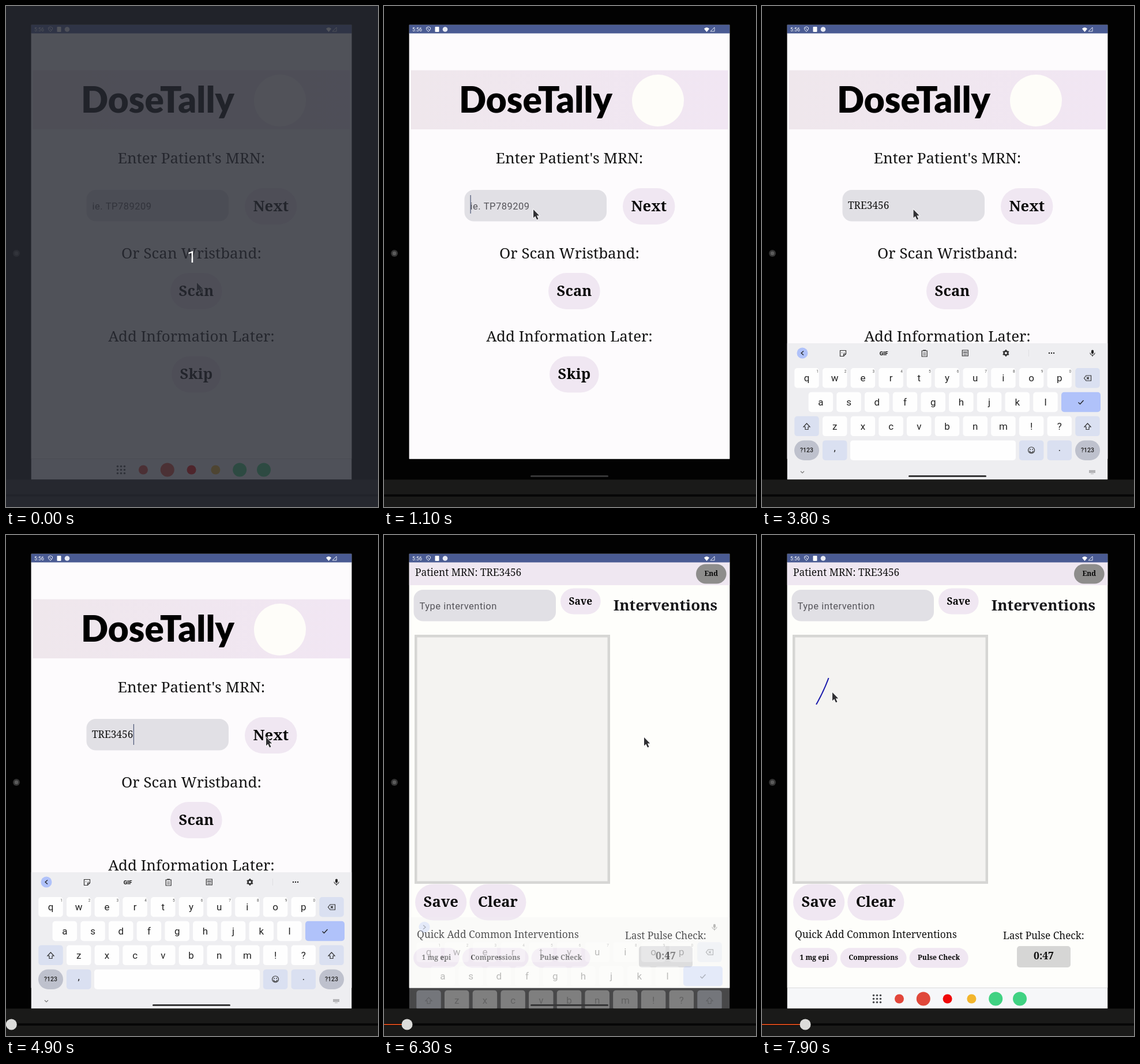
Recreate the animation shown at these times as an HTML page with a canvas. Size 645x869 px, loop 8 s.

```html
<!DOCTYPE html>
<html lang="en">
<head>
<meta charset="utf-8">
<title>Patient charting demo</title>
<style>
html, body { margin: 0; width: 100%; height: 100%; overflow: hidden; background: #000; }
canvas { display: block; }
</style>
</head>
<body>
<canvas id="stage" width="645" height="869"></canvas>
<script>
const ctx = document.getElementById('stage').getContext('2d');
const LOOP = 8000;
const STEP = 100;
const SERIF = '"Noto Serif", serif';
const SANS = 'Roboto, sans-serif';
const LILAC = '#f0e7f2', FIELD = '#e1e0e5', INK = '#111', ICON = '#333';
const KEY_WHITE = '#fefefe', KEY_BLUE = '#dae0f1', KEY_GREY = '#bec1cd', ACCENT = '#b0c2fa';
const SCREEN = { left: 43.5, top: 32.5, width: 556, navY: 785.5, bottom: 821.5 };
const MRN = 'TRE3456';
const COMMIT = 3300, NEXT_CLICK = 4300;

const clamp = (v, low, high) => Math.min(high, Math.max(low, v));
const ramp = (t, from, to) => clamp((t - from) / (to - from), 0, 1);
const easeOut = k => 1 - (1 - k) ** 2;
const easeInOut = k => k < 0.5 ? 4 * k ** 3 : 1 - 4 * (1 - k) ** 3;

function rect(x, y, w, h, color) {
  ctx.fillStyle = color;
  ctx.fillRect(x, y, w, h);
}

function round(x, y, w, h, r, color) {
  ctx.fillStyle = color;
  ctx.beginPath();
  ctx.roundRect(x, y, w, h, r);
  ctx.fill();
}

function disc(x, y, r, color) {
  round(x - r, y - r, 2 * r, 2 * r, r, color);
}

function text(str, x, y, font, color = INK, align = 'left', spacing = 0) {
  ctx.font = font;
  ctx.fillStyle = color;
  ctx.textAlign = align;
  ctx.letterSpacing = spacing + 'px';
  ctx.fillText(str, x, y);
  ctx.letterSpacing = '0px';
}

// Strokes a small path given relative to (x, y).
function glyph(path, x, y, color = ICON, width = 1.2, fill) {
  ctx.save();
  ctx.translate(x, y);
  ctx.strokeStyle = color;
  ctx.lineWidth = width;
  const shape = new Path2D(path);
  ctx.stroke(shape);
  if (fill) {
    ctx.fillStyle = fill;
    ctx.fill(shape);
  }
  ctx.restore();
}

function ring(x, y, r, width = 1.2, from = 0, to = 2 * Math.PI) {
  ctx.beginPath();
  ctx.arc(x, y, r, from, to);
  ctx.strokeStyle = ICON;
  ctx.lineWidth = width;
  ctx.stroke();
}

function faded(alpha, draw) {
  if (alpha <= 0) return;
  ctx.save();
  ctx.globalAlpha = alpha;
  draw();
  ctx.restore();
}

// Pill that fits its label; returns the left edge of the next one in a row.
function button(label, x, midY, size, fill = LILAC) {
  ctx.font = `bold ${size}px ${SERIF}`;
  const width = ctx.measureText(label).width + 29;
  const height = 8.5 + 2.13 * size;
  round(x, midY - height / 2, width, height, height / 2, fill);
  text(label, x + width / 2, midY + 0.33 * size, ctx.font, '#080808', 'center');
  return x + width + 5;
}

function field(x, y, hint) {
  round(x, y, 246.5, 54.5, 16, FIELD);
  text(hint, x + 10, y + 34, `16.5px ${SANS}`, '#55545a', 'left', 0.5);
}

function typedCount(t) {
  const letters = clamp(Math.floor((t - 1600) / 100), 0, 3);
  const digits = clamp(Math.floor((t - 2270) / 130), 0, 4);
  return letters + digits;
}

const typedText = t => MRN.slice(0, typedCount(t));

// The caret blinks at 500 ms, restarting with each input event.
function caretVisible(t) {
  if (t < 800) return false;
  const now = Math.min(t, NEXT_CLICK);
  let last = now >= COMMIT ? COMMIT : now;
  while (last > 800 && last !== COMMIT && typedCount(last) === typedCount(last - STEP)) last -= STEP;
  return Math.floor((now - last) / 500) % 2 === 0;
}

function entryScreen(t) {
  rect(SCREEN.left, 47, SCREEN.width, SCREEN.navY - 47, '#fdfbfd');
  const banner = ctx.createLinearGradient(47, 0, 597, 0);
  banner.addColorStop(0, '#efe7ec');
  banner.addColorStop(1, '#f1e6f3');
  rect(46.5, 111.5, 550, 102.5, banner);
  text('DoseTally', 130, 185, '900 62px Lato, sans-serif', '#000');
  disc(475, 164, 45, '#fefdf9');

  const heading = (str, y) => text(str, 321.5, y, `26px ${SERIF}`, '#151515', 'center');
  heading("Enter Patient's MRN:", 273);
  heading('Or Scan Wristband:', 438);
  heading('Add Information Later:', 582);
  button('Next', 414, 347.5, 25.5);
  button('Scan', 285, 494.5, 25.5);
  button('Skip', 287, 639, 25.5);

  const typed = typedText(t);
  field(139.5, 319, typed ? '' : 'ie. TP789209');
  text(typed, 149, 352, `17.3px ${SERIF}`);
  const width = ctx.measureText(typed).width;
  if (t < COMMIT) rect(149, 354, width, 1.2, '#222');
  if (caretVisible(t)) rect(149.5 + width, 328, 1.2, typed ? 36 : 32, '#4a5575');
}

// Pen position while drawing: a nearly straight upstroke that steepens.
const penPoint = k => [94 + 26 * k - 4.5 * k * k, 294 - 46 * k];
const penProgress = t => easeInOut(ramp(t, 7400, 7800));

function chartScreen(t) {
  rect(SCREEN.left, 47, SCREEN.width, SCREEN.navY - 47, '#fefefb');
  rect(SCREEN.left, 47, SCREEN.width, 40, '#efe7f1');
  text('Patient MRN: ' + MRN, 54, 71, `17.3px ${SERIF}`);
  button('End', 541, 67.5, 12, '#8e8d8c');
  field(51.5, 95, 'Type intervention');
  button('Save', 306, 115, 17.2);
  text('Interventions', 488, 131, `bold 26px ${SERIF}`, '#19191c', 'center');

  rect(53, 173, 339, 432, '#d6d6d4');
  rect(57.5, 177.5, 330, 423, '#f4f3f1');
  button('Clear', button('Save', 54, 637, 25.5), 637, 25.5);
  text('Quick Add Common Interventions', 57, 699, `17.3px ${SERIF}`);
  text('Last Pulse Check:', 418, 701, `17.2px ${SERIF}`);
  ['1 mg epi', 'Compressions', 'Pulse Check']
    .reduce((x, label) => button(label, x, 733.5, 12.1), 51);
  round(442, 713, 93, 37, 5, '#d6d6d5');
  text('0:47', 488.5, 736, `bold 17.6px ${SERIF}`, INK, 'center');

  const drawn = penProgress(t);
  if (!drawn) return;
  ctx.beginPath();
  for (let i = 0; i <= 10; i++) ctx.lineTo(...penPoint(drawn * i / 10));
  ctx.strokeStyle = '#1a1aac';
  ctx.lineWidth = 2;
  ctx.stroke();
}

function statusBar() {
  rect(SCREEN.left, SCREEN.top, SCREEN.width, 15, '#4a5b93');
  text('5:56', 49, 44, `8.8px ${SANS}`, '#fff');
  glyph('M0-4l3.5 1.5v3l-3.5 4-3.5-4v-3zM-2-2l4 4', 77, 40, '#e8ebf5', 1);
  round(88.5, 36, 7, 9, 1, '#fff');
  disc(106, 40.5, 4.3, '#e8ebf5');
  glyph('M0 4l-4-5q4-3.5 8 0z', 559.5, 40.5, '#fff', 1, '#fff');
  glyph('M-3.5 3.5h7v-7z', 569.5, 40.5, '#dfe3f0', 1);
}

function dock() {
  rect(SCREEN.left, SCREEN.navY, SCREEN.width, 37, '#f6f7f9');
  for (let i = 0; i < 9; i++) disc(193.5 + i % 3 * 6, 798.5 + Math.floor(i / 3) * 6, 1.8, '#4b4d50');
  const apps = ['#e2463a', '#e0483a', '#f00808', '#f2b52c', '#40d282', '#40d282'];
  apps.forEach((color, i) => disc(238 + i * 41.8, 804.5, i % 4 === 1 || i > 3 ? 12 : 8, color));
}

const column = i => 77.5 + i * 48.7;
const rowY = row => 628 + row * 41.8;

function key(x, row, label = '', fill = KEY_WHITE, width = 42.5, r = 5, font = `17px ${SANS}`) {
  round(x - width / 2, rowY(row), width, 34.5, r, fill);
  text(label, x, rowY(row) + (label.length > 1 ? 21 : 23), font, '#222', 'center');
}

function suggestions(word) {
  [word, 'R' + word.slice(1), word + '09'].forEach((str, i) =>
    text(str, 161 + i * 159.5, 607, `12.8px ${SANS}`, ICON, 'center'));
  for (const x of [237, 405]) rect(x, 595, 1, 14, '#d8d8dc');
}

function toolIcons() {
  const slot = i => 140.5 + i * 70.6;
  glyph('M-5-4.5h10v6l-4 4h-6zM5 1.5h-4v4M-2-1v1M2-1v1', slot(0), 602);
  text('GIF', slot(1), 605.5, `900 9.5px ${SANS}`, '#222', 'center');
  glyph('M-4.5-4h9v10h-9zM-2.5-5h5M-2.5 0h5M-2.5 3h5', slot(2), 602);
  glyph('M-5-5h10v10h-10zM-3.5-2h7M-3.5 0h7M-3 3h6', slot(3), 602);
  ring(slot(4), 602, 3.4, 2.6);
  for (let i = 0; i < 6; i++) {
    const angle = (i + 0.5) * Math.PI / 3;
    disc(slot(4) + 4.8 * Math.cos(angle), 602 + 4.8 * Math.sin(angle), 1.2, ICON);
  }
  for (let i = -1; i < 2; i++) disc(502 + 4 * i, 602, 1.2, '#222');
  rect(462, 596, 1, 12, '#dedee2');
}

function strip(t) {
  const word = t < COMMIT ? typedText(t) : '';
  const closing = t > 6100;
  disc(70, 602, 9.5, ACCENT);
  glyph(word || closing ? 'M-2-3.5l4 3.5-4 3.5' : 'M2-3.5l-4 3.5 4 3.5', 70, 602, '#222', 1.3);
  if (word) suggestions(word);
  else if (!closing) toolIcons();
  round(571, 596.5, 4, 7, 2, '#222');
  ring(573, 601.5, 4, 1.2, 0, Math.PI);
  rect(572.4, 605, 1.2, 3, ICON);
}

function keyboard(t) {
  rect(SCREEN.left, 585, SCREEN.width, 237, '#eeeef1');
  strip(t);
  ['qwertyuiop', 'asdfghjkl', 'zxcvbnm!?'].forEach((letters, row) =>
    [...letters].forEach((c, i) => key(column(i + row / 2), row, c)));
  for (let i = 0; i < 10; i++) {
    text((i + 1) % 10, column(i) + 18.5, 636, `6.5px ${SANS}`, '#555', 'center');
  }

  key(column(10), 0, '', KEY_BLUE);
  glyph('M-6 0l3.5-4.5h8.5v9h-8.5zM-1.5-2l4 4M2.5-2l-4 4', column(10), 645.5);
  key(553, 1, '', ACCENT, 68);
  glyph('M-4.5 0l3 3 6-6.5', 553, 687.5, '#222', 1.4);
  for (const x of [column(0), column(10)]) {
    key(x, 2, '', KEY_BLUE);
    glyph('M0-5.5l5.5 6h-3v4.5h-5v-4.5h-3z', x, 729.5);
    key(x, 3, '?123', KEY_GREY, 43, 17, `500 10.5px ${SANS}`);
  }
  key(column(1), 3, '', KEY_BLUE);
  text(',', column(1), 771.5, `17px ${SANS}`, '#222', 'center');
  key(296.5, 3, '', KEY_WHITE, 287);
  key(column(8), 3, '', KEY_BLUE);
  ring(column(8), 770.5, 5.5);
  ring(column(8), 771.5, 3, 1.2, 0, Math.PI);
  for (const side of [-2, 2]) disc(column(8) + side, 769, 0.9, ICON);
  key(column(9), 3, '', KEY_BLUE);
  disc(column(9), 771, 1, ICON);

  glyph('M-3-1.5l3 3 3-3', 70, 808.5, '#777');
  rect(567, 805, 11, 5, '#b4b4b7');
  rect(570, 811, 5, 1, '#b4b4b7');
}

function cursorPoint(t) {
  const field = [259, 353], next = [451, 351];
  const glide = (a, b, from, to) => {
    const k = easeInOut(ramp(t, from, to));
    return a.map((v, i) => v + (b[i] - v) * k);
  };
  if (t < 3700) return glide([331, 480], field, 0, 500);
  if (t < 6500) return glide(field, next, 3700, NEXT_CLICK);
  if (t < 7400) return glide(next, penPoint(0), 6500, 7100);
  return t <= 7800 ? penPoint(penProgress(t)) : [122, 273];
}

function playerBar(t) {
  rect(0, SCREEN.bottom, 645, 48, '#1a1a19');
  rect(0, 847, 645, 4, '#070707');
  if (t < 3900) return;
  const tick = Math.floor((t - 100) / 200) * 200 + 100;
  const x = 0.6 + 0.0219 * (tick - 4500);
  rect(0, 848, Math.max(0, x), 2, '#d04a1c');
  disc(x, 849, 9.5, '#dcdcda');
}

function countdown(t) {
  const left = 1 - t / 600;
  faded(left * 0.81, () => rect(0, 0, 645, 869, '#292c34'));
  faded(left, () => text('1', 322, 445, `28px ${SANS}`, '#fff', 'center'));
}

function render(t) {
  rect(0, 0, 645, 869, '#020202');
  disc(18, 429, 6, '#343434');
  disc(18, 429, 3.2, '#5c5c5c');

  ctx.save();
  ctx.beginPath();
  ctx.rect(SCREEN.left, SCREEN.top, SCREEN.width, SCREEN.bottom - SCREEN.top);
  ctx.clip();
  rect(SCREEN.left, SCREEN.top, SCREEN.width, SCREEN.navY - SCREEN.top, '#fff');
  faded(1 - ramp(t, 5400, 5800), () => entryScreen(t));
  faded(easeOut(ramp(t, 5400, 5900)), () => chartScreen(t));
  statusBar();

  const hidden = t < 6100 ? 1 - ramp(t, 1100, 1500) : ramp(t, 6100, 6500);
  faded((1 - hidden) ** 1.75, () => {
    ctx.translate(0, 237 * hidden ** 1.6);
    keyboard(t);
  });
  round(254, 814, 135, 3, 1.5, '#363637');
  faded(t < 1100 ? 1 : ramp(t, 6700, 7000), dock);
  ctx.restore();

  playerBar(t);
  const [x, y] = cursorPoint(t);
  glyph('M0 0v14.5l3.3-3 2.7 6 2.5-1-2.7-6h4.4z', x, y, '#fff', 1.6, '#303033');
  countdown(t);
}

const start = performance.now();
function loop() {
  const elapsed = (performance.now() - start) % LOOP;
  render(Math.floor(elapsed / STEP) * STEP);
  requestAnimationFrame(loop);
}
loop();
</script>
</body>
</html>
```
